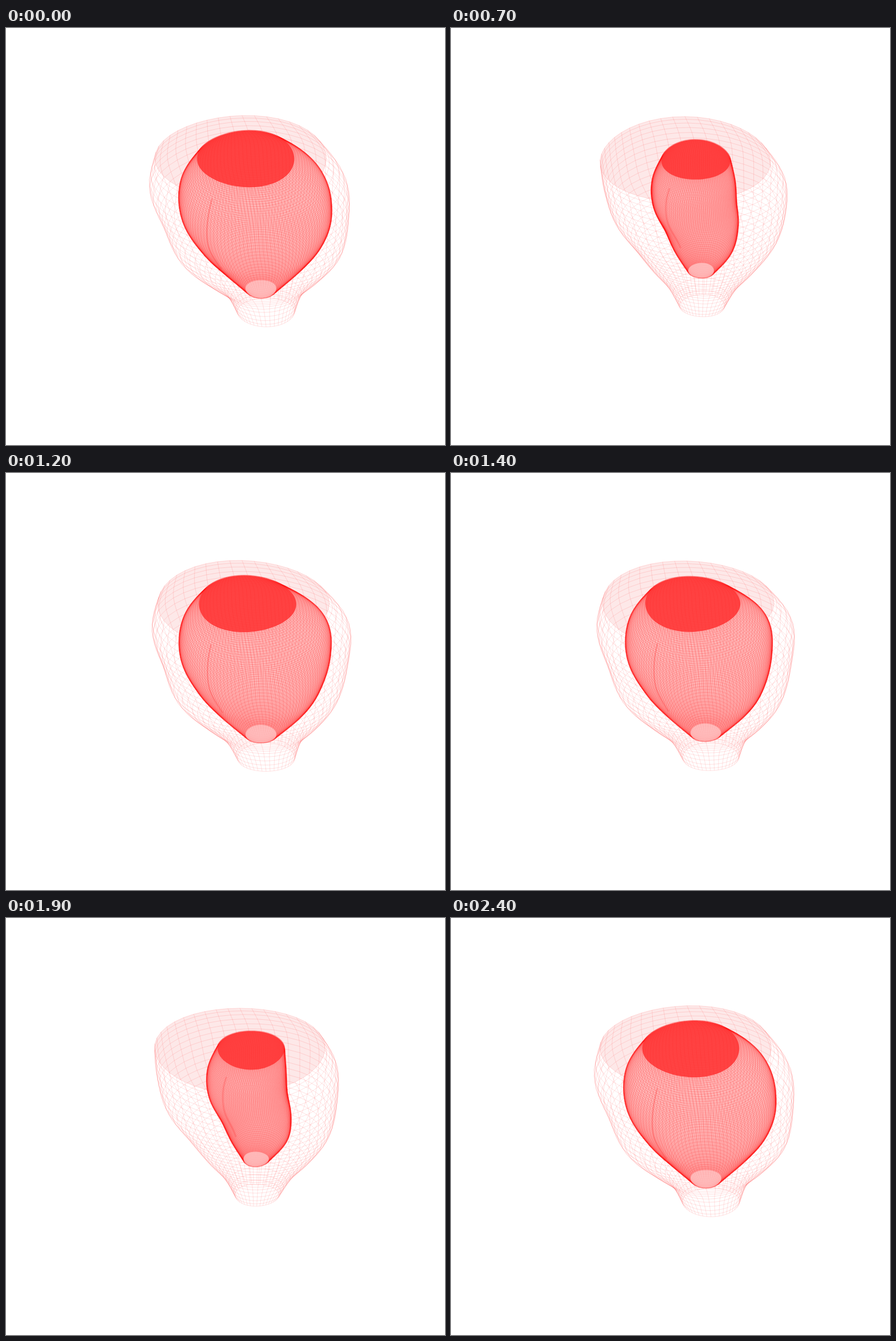
These frames come from a looping animation (768x729 px, 2.5 s). An HTML page with a canvas:

```html
<!DOCTYPE html>
<html lang="en">
<head>
<meta charset="utf-8">
<title>Beating ventricle</title>
<style>
html, body { margin: 0; width: 100%; height: 100%; overflow: hidden; background: #fff; }
canvas { display: block; }
</style>
</head>
<body>
<canvas id="stage" width="768" height="729"></canvas>
<script>
const ctx = document.getElementById('stage').getContext('2d');
const LOOP = 2500, BEAT = LOOP / 2, STEP = 100, TAU = Math.PI * 2;

// Each wall is a stack of rings (x, y, radius) from its open top to its tip.
const outer = {
  flat: 0.5, rings: 30, spokes: 44, lump: 0.018,
  full: [[413, 228, 150], [426, 276, 173], [436, 330, 163], [441, 382, 146],
    [447, 420, 110], [451, 456, 70], [455, 497, 50]],
  tight: [[409, 231, 149], [424, 272, 158], [431, 322, 150], [442, 366, 126],
    [442, 406, 96], [440, 444, 62], [438, 484, 38]]
};
const inner = {
  flat: 0.58, rings: 90, spokes: 120, lump: 0.02,
  full: [[421, 229, 85], [433, 272, 126], [437, 318, 131], [443, 362, 112],
    [446, 402, 80], [446, 456, 27]],
  tight: [[429, 231, 57], [422, 268, 66], [424, 306, 66], [437, 345, 59],
    [442, 382, 48], [437, 420, 22]]
};

const mix = (a, b, t) => a + (b - a) * t;
const smooth = t => t * t * (3 - 2 * t);

// 0 when filled, 1 when fully squeezed; squeezing is quicker than refilling.
function squeeze(time) {
  const p = (time % BEAT) / BEAT;
  const q = p + 0.09 * Math.sin(Math.PI * p) ** 2;
  return smooth(Math.sin(Math.PI * q) ** 2);
}

// Catmull-Rom through a list of rings, v from 0 to 1.
function along(rings, v) {
  const last = rings.length - 1;
  const i = Math.min(last - 1, Math.floor(v * last)), x = v * last - i;
  const at = j => rings[Math.max(0, Math.min(last, j))];
  return rings[0].map((_, k) => {
    const [a, b, c, d] = [-1, 0, 1, 2].map(o => at(i + o)[k]);
    return b + x * ((c - a) + x * ((2 * a - 5 * b + 4 * c - d) + x * (3 * (b - c) + d - a))) / 2;
  });
}

// Grid of points: one row per ring, with gentle lumps that drift once per loop.
function buildRows(wall, time) {
  const s = squeeze(time), drift = TAU * time / LOOP;
  const shape = wall.full.map((ring, i) => ring.map((n, k) => mix(n, wall.tight[i][k], s)));
  return Array.from({ length: wall.rings + 1 }, (_, i) => {
    const v = i / wall.rings;
    const [x, y, r] = along(shape, v);
    return Array.from({ length: wall.spokes + 1 }, (_, j) => {
      const a = j / wall.spokes * TAU;
      const size = r * (1 + wall.lump * Math.sin(3 * a + 5 * v + drift));
      return [x + size * Math.sin(a), y - wall.flat * size * Math.cos(a)];
    });
  });
}

function trace(points) {
  const path = new Path2D();
  for (const p of points) path.lineTo(...p);
  return path;
}

function pen(width, alpha) {
  ctx.lineWidth = width;
  ctx.strokeStyle = `rgba(255,0,0,${alpha})`;
}

function fill(path, color) {
  ctx.fillStyle = color;
  ctx.fill(path);
}

function drawMesh(rows, paths) {
  for (const path of paths) ctx.stroke(path);
  for (let j = 1; j < rows[0].length; j++) ctx.stroke(trace(rows.map(row => row[j])));
}

function drawOuter(time) {
  const rows = buildRows(outer, time), paths = rows.map(trace);
  fill(paths[0], '#fde8e8');
  pen(0.7, 0.17);
  drawMesh(rows, paths);
}

function drawInner(time) {
  const rows = buildRows(inner, time), paths = rows.map(trace);
  const mouth = paths[0], tip = paths[paths.length - 1];

  // Filling after stroking leaves a red line only around the silhouette.
  pen(3, 0.3);
  for (const path of paths) ctx.stroke(path);
  for (const path of paths) fill(path, '#ffbcbc');

  pen(0.6, 0.25);
  drawMesh(rows, paths);
  fill(tip, 'rgba(255,205,205,0.55)');

  // Crease down the front left.
  const crease = Math.round(inner.spokes * 0.61);
  pen(3, 0.15);
  ctx.stroke(trace(rows.slice(10, 60).map(row => row[crease])));

  fill(mouth, '#ff4444');
  ctx.save();
  ctx.clip(mouth);
  pen(0.6, 0.18);
  drawMesh(rows, paths);
  ctx.restore();
}

const origin = performance.now();
let shown = -1;
ctx.lineJoin = 'round';

function tick() {
  const elapsed = Math.max(0, performance.now() - origin) % LOOP;
  const time = Math.floor(elapsed / STEP) * STEP;
  if (time !== shown) {
    shown = time;
    ctx.clearRect(0, 0, 768, 729);
    drawOuter(time);
    drawInner(time);
  }
  requestAnimationFrame(tick);
}
tick();
</script>
</body>
</html>
```
